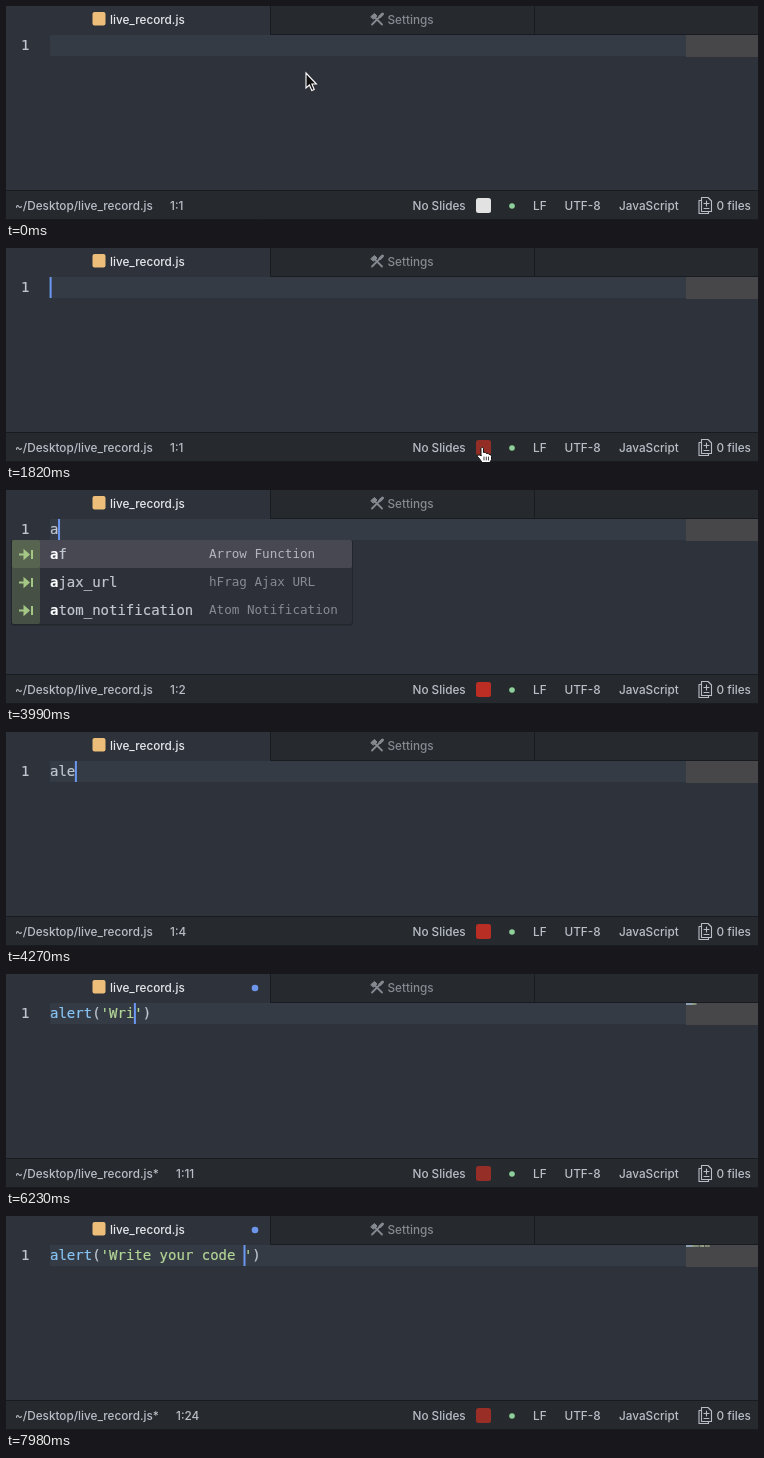
Animation, 752 px wide and 214 px high, one loop 8000 ms. Source, as an HTML page:

```html
<!DOCTYPE html>
<html lang="en">
<head>
<meta charset="utf-8">
<title>Editor recording</title>
<style>
html, body { margin: 0; width: 100%; height: 100%; overflow: hidden; background: #2e323b; }
svg { display: block; width: 752px; height: 214px; }
text { font: 500 11.75px Inter, sans-serif; fill: #b9bec6; white-space: pre; }
.code, .code text { font: 14px "DejaVu Sans Mono", monospace; fill: #c0c6cf; stroke: #c0c6cf; stroke-width: .2px; }
.code .fn { fill: #86c3f3; stroke: #86c3f3; }
.code .str { fill: #b2d596; stroke: #b2d596; }
.code .match { fill: #fff; font-weight: bold; }
.code .hint { font-size: 12.6px; fill: #868a93; stroke: none; }
.line { fill: none; stroke-linecap: round; stroke-linejoin: round; }
</style>
</head>
<body>
<svg viewBox="0 0 752 214">
  <!-- tabs -->
  <rect width="752" height="214" fill="#2e323b"/>
  <rect x="264" width="488" height="28" fill="#262a2f"/>
  <path d="M264.5 0V28.5H752M528.5 0V28" fill="none" stroke="#181b1f"/>
  <rect x="86.5" y="6" width="13" height="13.5" rx="2" fill="#edbd7a"/>
  <text x="104" y="18" style="fill:#e6e8ec">live_record.js</text>
  <circle id="dirty" cx="249" cy="14" r="3.3" fill="#6d96ea"/>
  <g class="line" stroke="#858a90" stroke-width="1.8">
    <path d="M366 18.5L374 10.5M369 11.5L376 18.5"/>
    <path d="M365 10.5L368.5 7.5L371 10L367.5 13Z" fill="#858a90" stroke-width="1"/>
    <path d="M376.5 8L374 10.5" stroke-width="3"/>
  </g>
  <text x="381.5" y="18" style="fill:#868b91">Settings</text>

  <!-- editor -->
  <rect x="44" y="29" width="636" height="21" fill="#353b45"/>
  <rect x="680" y="29" width="72" height="22" fill="#474749"/>
  <g id="minimap"></g>
  <g class="code">
    <text x="15" y="44">1</text>
    <text id="code" x="44" y="44"></text>
  </g>
  <path id="brackets" d="M86 49.5H103.5" stroke="#5f91e8"/>
  <rect id="caret" y="29" width="2" height="21" fill="#6b97f0"/>
  <g id="popup" class="code">
    <rect x="5" y="50" width="342" height="85.5" rx="3" fill="#23262c" stroke="none"/>
    <g stroke="none">
      <rect x="6" y="50" width="340" height="84" rx="2" fill="#2d3038"/>
      <rect x="6" y="50" width="340" height="28" rx="2" fill="#474852"/>
      <rect x="6" y="50" width="28" height="84" rx="2" fill="#465045"/>
      <rect x="6" y="50" width="28" height="28" rx="2" fill="#57644f"/>
    </g>
    <g id="rows"></g>
  </g>

  <!-- status bar -->
  <rect y="184" width="752" height="30" fill="#262a2f"/>
  <path d="M0 184.5H752M0 213.5H752" stroke="#181b1f"/>
  <text id="path" x="9" y="204"></text>
  <text id="position" y="204"></text>
  <text x="406.5" y="204">No Slides</text>
  <rect id="record" x="470" y="192" width="15" height="15" rx="2.5"/>
  <circle cx="506" cy="200" r="2.8" fill="#8fd09a"/>
  <text x="527" y="204">LF</text>
  <text x="558.5" y="204">UTF-8</text>
  <text x="613" y="204">JavaScript</text>
  <path class="line" stroke="#b9bec6" stroke-width="1.1"
    d="M695.5 194.5H693V207.5H702.5V205.5M695.5 191.5H702L705.5 195V205.5H695.5ZM698 197.5H703M700.5 195V200M698 202.5H703"/>
  <text x="710.5" y="204">0 files</text>

  <!-- mouse pointers, each with its hot spot at 0,0 -->
  <g id="mouse">
    <path id="arrow" d="M0 0V15L3.4 12L5.8 17.5L8.2 16.5L5.9 11H10.4Z" fill="#111" stroke="#fff" stroke-width="1.1"/>
    <g id="hand" class="line" stroke="#111">
      <path d="M-2.5 8V1Q-1.5 -1.5 0 1V5Q2 4 2.8 6Q5 5 5.6 7Q8 6.5 8 9V12Q7 14 6.3 15H-1.5Q-3 12 -6 9Q-6 6.5 -2.5 8Z" fill="#fff"/>
      <path d="M.5 9.5V12.5M2.8 9.5V12.5M5 9.5V12.5" stroke-width=".8"/>
    </g>
    <g id="beam" class="line">
      <path d="M-3 -8Q0 -8 0 -6Q0 -8 3 -8M0 -6V6M-3 8Q0 8 0 6Q0 8 3 8M-2 2H2" stroke="#15171b" stroke-width="3"/>
      <path d="M-3 -8Q0 -8 0 -6Q0 -8 3 -8M0 -6V6M-3 8Q0 8 0 6Q0 8 3 8M-2 2H2" stroke="#fff" stroke-width="1.3"/>
    </g>
  </g>
</svg>
<script>
const LOOP = 8000, CHAR = 8.43, PULSE = 1480;
const RECORD_AT = 1610, DIRTY_AT = 4830;
const TYPED = "alert('Write your code ";
const KEY_TIMES = [3850, 4060, 4200, 4340, 4480, 5180, 5600, 5880, 6020, 6160];
for (let i = KEY_TIMES.length; i < TYPED.length; i++) KEY_TIMES.push(6370 + (i - 10) * 125);
const CARET_TOGGLES = [370, 770, 1190, 1960, 2380, 2800, 3150, 3570];
const MOUSE_PATH = [[0, 300, 67], [70, 300, 67], [800, 483, 198], [1190, 477.5, 199.5],
  [1820, 477.5, 199.5], [2590, 336, 113]];

const $ = id => document.getElementById(id);
const show = (id, on) => { $(id).style.display = on ? "" : "none"; };
const span = (cls, s) => `<tspan class="${cls}">${s}</tspan>`;
const smooth = k => k * k * (3 - 2 * k);

$("rows").innerHTML = [["af", "Arrow Function"], ["ajax_url", "hFrag Ajax URL"], ["atom_notification", "Atom Notification"]]
  .map(([word, hint], i) => {
    const y = 50 + 28 * i;
    return `<path d="M13 ${y + 14.5}H20M18.5 ${y + 11}L22.5 ${y + 14.5}L18.5 ${y + 18}ZM26 ${y + 10}V${y + 19}"
        fill="#a5c785" stroke="#a5c785" stroke-width="2"/>
      <text x="44" y="${y + 18.5}">${span("match", word[0])}${word.slice(1)}</text>
      <text class="hint" x="203" y="${y + 18}"${i ? "" : ' style="fill:#b3b6bd"'}>${hint}</text>`;
  }).join("");

function mouseAt(t) {
  const next = MOUSE_PATH.findIndex(p => p[0] > t);
  if (next < 0) return MOUSE_PATH.at(-1).slice(1);
  const [t0, x0, y0] = MOUSE_PATH[next - 1], [t1, x1, y1] = MOUSE_PATH[next];
  const k = smooth((t - t0) / (t1 - t0));
  return [x0 + (x1 - x0) * k, y0 + (y1 - y0) * k];
}

function drawCode(t) {
  const count = KEY_TIMES.filter(k => k <= t).length;
  const called = count > 5, quoted = count > 6;
  const typed = TYPED.slice(0, count);
  $("code").innerHTML = called
    ? span("fn", "alert") + "(" + (quoted ? span("str", typed.slice(6) + "'") : "") + ")"
    : typed;
  $("minimap").innerHTML = called
    ? `<rect x="680" y="29" width="6" height="2" fill="#8ba0b2"/>` +
      (quoted ? [...typed.slice(6)].map((c, i) => c === " " ? "" :
        `<rect x="${686 + i * 1.1}" y="29" width="1.1" height="2" fill="#929f84"/>`).join("") : "")
    : "";
  show("brackets", count === 6);
  $("caret").setAttribute("x", 43.6 + count * CHAR);
  show("caret", count
    ? t - KEY_TIMES[count - 1] < 420
    : CARET_TOGGLES.filter(k => k <= t).length % 2);
  show("popup", t >= 3900 && t < 4130);

  const dirty = t >= DIRTY_AT;
  show("dirty", dirty);
  $("path").textContent = "~/Desktop/live_record.js" + (dirty ? "*" : "");
  $("position").textContent = "1:" + (count + 1);
  $("position").setAttribute("x", dirty ? 170 : 164);
}

function drawRecord(t) {
  const k = (1 - Math.cos((t - 3360) / PULSE * 2 * Math.PI)) / 2;
  const mix = (a, b) => Math.round(a + (b - a) * k);
  $("record").setAttribute("fill", t < RECORD_AT ? "#e2e2e3"
    : `rgb(${mix(146, 190)},${mix(46, 46)},${mix(38, 36)})`);
}

function drawMouse(t) {
  const [x, y] = mouseAt(t);
  const over = x > 468 && x < 487 && y > 190 && y < 209;
  const beam = t > 1820 && y < 184;
  show("mouse", t < KEY_TIMES[0]);
  show("hand", over);
  show("beam", beam);
  show("arrow", !over && !beam);
  $("mouse").setAttribute("transform", `translate(${x} ${y})`);
}

function frame(now) {
  const t = now % LOOP;
  drawCode(t);
  drawRecord(t);
  drawMouse(t);
  requestAnimationFrame(frame);
}
frame(0);
</script>
</body>
</html>
```
